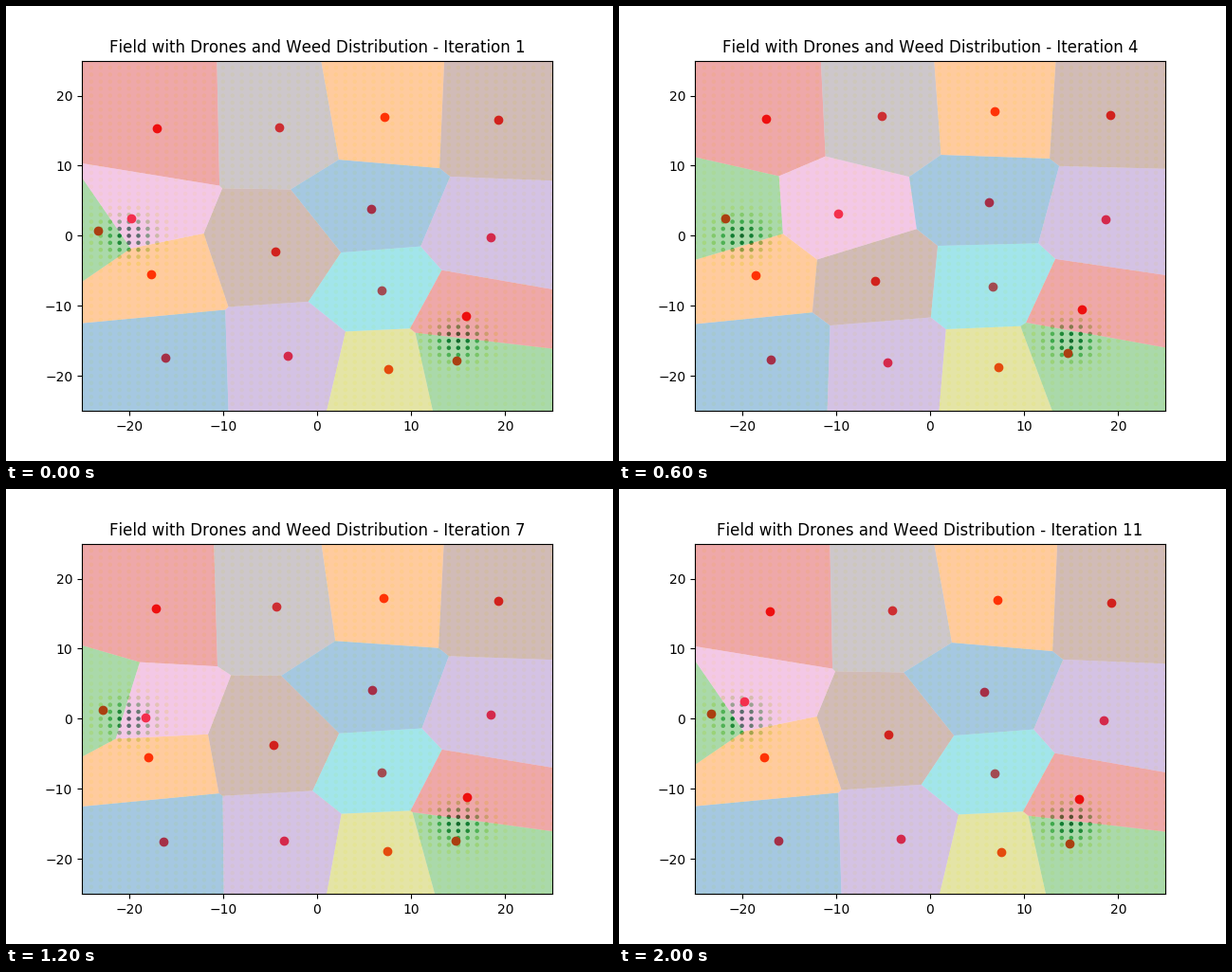
Animation of 640x480 px, one loop 2200 ms. Source, as a matplotlib script:

```python
import numpy as np
import matplotlib.pyplot as plt
from matplotlib.animation import FuncAnimation

plt.rcParams["text.kerning_factor"] = 6

HALF = 25
ITERATIONS = 11
LONG_TRIP = 4.5
BOX = [(-HALF, -HALF), (HALF, -HALF), (HALF, HALF), (-HALF, HALF)]
COLORS = [f"C{i}" for i in range(10)]
COLORS[7] = "#84757f"           # grey with a purple tint

# first and resting place of each drone, by column and upwards
TRIPS = np.array([
    [(-17.5, -17.9), (-16.1, -17.4)],
    [(-19.2, -5.6), (-17.6, -5.5)],
    [(-20.8, 3.7), (-23.3, 0.7)],
    [(-17.8, 17.6), (-17.0, 15.3)],
    [(-5.5, -18.6), (-3.1, -17.1)],
    [(-6.2, -6.8), (-4.4, -2.2)],
    [(-6.9, 5.5), (-19.8, 2.5)],
    [(-5.9, 18.2), (-4.0, 15.5)],
    [(7.1, -18.6), (7.6, -19.0)],
    [(6.5, -7.0), (6.9, -7.8)],
    [(6.6, 5.5), (5.7, 3.8)],
    [(6.6, 18.3), (7.2, 17.0)],
    [(14.5, -16.0), (14.8, -17.8)],
    [(16.3, -10.0), (15.8, -11.4)],
    [(18.8, 4.0), (18.4, -0.2)],
    [(19.1, 17.6), (19.3, 16.6)],
])


def travel(start, end, u):
    """Short trips ease out; long ones start slowly and dip on the way."""
    length = np.hypot(*(end - start))
    if length < LONG_TRIP:
        return start + (end - start) * (1 - (1 - u) ** 2)
    ease = (1 - np.cos(np.pi * min(1.4 * u, 1))) / 2
    dip = 0.2 * length * np.sin(np.pi * u)
    return start + (end - start) * ease - np.array([0, dip])


def positions(iteration):
    # the first iteration already shows the settled layout
    u = 1 if iteration == 1 else (iteration - 2) / (ITERATIONS - 2)
    return np.array([travel(start, end, u) for start, end in TRIPS])


def clip(poly, mid, normal):
    """Keep the part of poly lying behind the line through mid."""
    out = []
    for a, b in zip(poly, poly[1:] + poly[:1]):
        da, db = np.dot(a - mid, normal), np.dot(b - mid, normal)
        if da <= 0:
            out.append(a)
        if da * db < 0:
            out.append(a + (b - a) * da / (da - db))
    return out


def cell(points, i):
    """Voronoi cell of point i inside the field."""
    poly = [np.array(corner, float) for corner in BOX]
    for j, other in enumerate(points):
        if j != i:
            poly = clip(poly, (points[i] + other) / 2, other - points[i])
    return poly


def weed_patch(gx, gy, cx, cy, sigma=2):
    return np.exp(-((gx - cx) ** 2 + (gy - cy) ** 2) / (2 * sigma ** 2))


fig, ax = plt.subplots(figsize=(6.4, 4.8), dpi=100)
ax.set_xlim(-HALF, HALF)
ax.set_ylim(-HALF, HALF)
title = ax.set_title("")

side = np.arange(-HALF, HALF + 1)
gx, gy = np.meshgrid(side, side)
weeds = weed_patch(gx, gy, -20, 0) + weed_patch(gx, gy, 15, -15)
ax.scatter(gx, gy, c=weeds, cmap="YlGn", s=5, zorder=1)

# translucent cells lie over both the weeds and the drones
dots = ax.scatter(*positions(1).T, color="red", zorder=1.1)
cells = [ax.fill(*zip(*BOX), facecolor=COLORS[i % 10], alpha=0.4,
                 linewidth=0, zorder=1.2)[0] for i in range(len(TRIPS))]


def update(frame):
    iteration = frame + 1
    points = positions(iteration)
    dots.set_offsets(points)
    for i, shape in enumerate(cells):
        shape.set_xy(cell(points, i))
    title.set_text("Field with Drones and Weed Distribution"
                   f" - Iteration {iteration}")
    return [dots, title, *cells]


anim = FuncAnimation(fig, update, frames=ITERATIONS, interval=200,
                     repeat=True, repeat_delay=0, blit=False)
plt.show()
```
